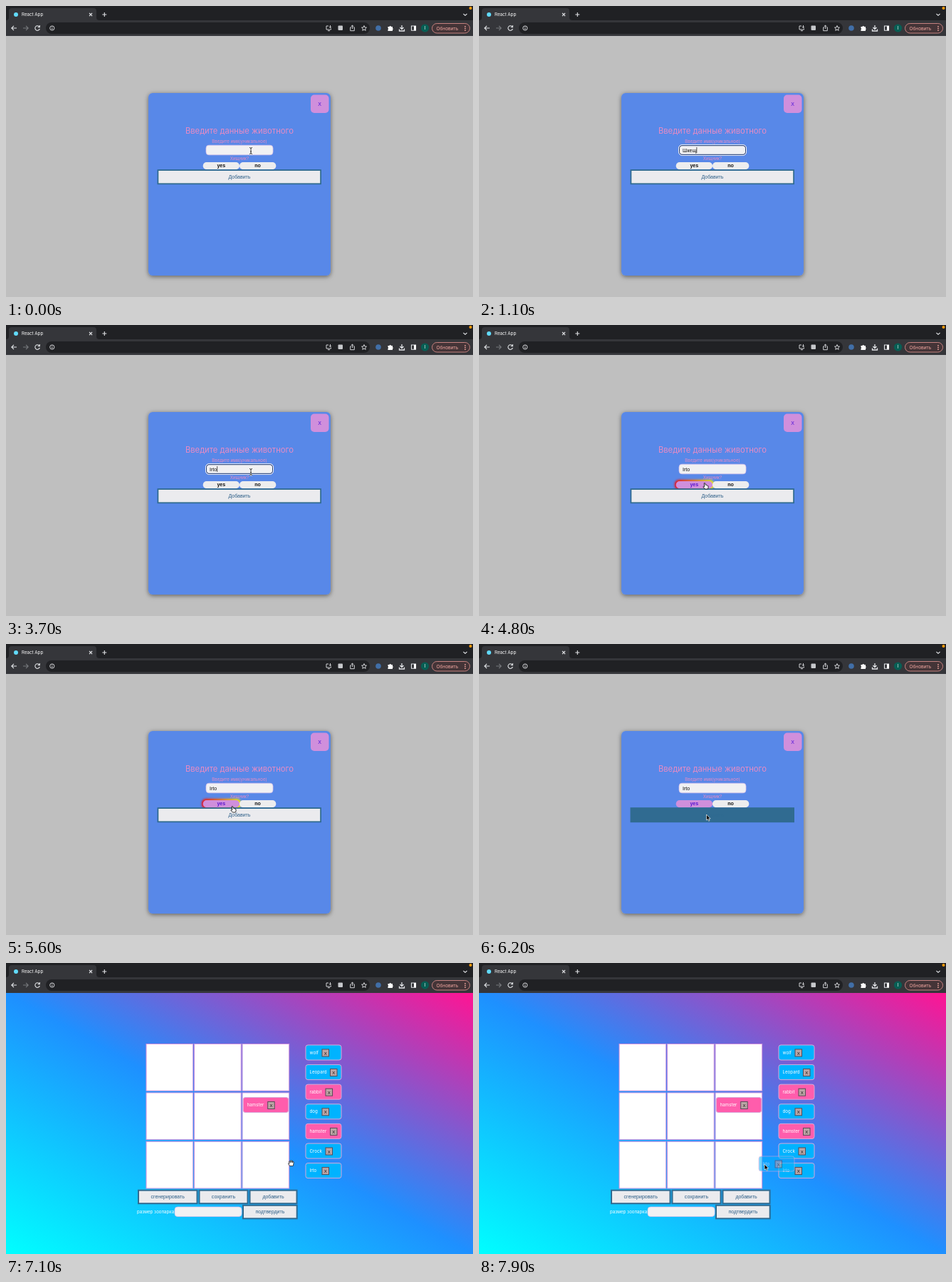
An HTML page for the animation above (8000 ms loop, 656 px wide and 408 px high).

```html
<!DOCTYPE html>
<html lang="ru">
<head>
<meta charset="utf-8">
<title>React App</title>
<style>
  html, body { margin: 0; width: 100%; height: 100%; overflow: hidden; background: #bfbfbf; }
  svg { display: block; }
  text { font-family: Inter, Roboto, sans-serif; font-size: 6.2px; fill: #fff; }
  .mid { text-anchor: middle; }
  .arial { font-family: "Liberation Sans", Arial, sans-serif; font-size: 7px; fill: #111; }
  .teal { fill: #2b5d86; }
  .bold { font-weight: bold; }
  .pink { fill: #e78bc4; }
  .icon { fill: none; stroke: #e2e4e7; stroke-width: 1.1; }
  .button { fill: #ebebee; stroke: #306b91; stroke-width: 2; }
  .field { fill: #f1f1f3; stroke: #d9bfe9; stroke-width: .7; }
  .cell { fill: #fff; stroke: #cc8edb; stroke-width: 1; }
  .card { stroke: #d9a7d9; stroke-width: 1; }
</style>
</head>
<body>
<svg id="stage" width="656" height="408" viewBox="0 0 656 408">
  <defs>
    <linearGradient id="sky" x1="0" y1="1" x2="1" y2="0">
      <stop stop-color="#0ff"/><stop offset=".5" stop-color="#1e90ff"/><stop offset="1" stop-color="#ff1493"/>
    </linearGradient>
    <linearGradient id="fire">
      <stop stop-color="#f00"/><stop offset=".5" stop-color="#ff7300"/><stop offset="1" stop-color="#fffb00"/>
    </linearGradient>
    <linearGradient id="glass" x2="0" y2="1">
      <stop stop-color="#223356"/><stop offset="1" stop-color="#28344f"/>
    </linearGradient>
    <filter id="blur" x="-20%" y="-60%" width="140%" height="220%"><feGaussianBlur stdDeviation="1.7"/></filter>
    <filter id="shadow"><feDropShadow dx="0" dy="1.5" stdDeviation="3" flood-opacity=".5"/></filter>
    <g id="ibeam" fill="none">
      <path id="beam" d="M-2 -4.5Q0 -4.5 0 -3Q0 -4.5 2 -4.5M0 -3V3M-2 4.5Q0 4.5 0 3Q0 4.5 2 4.5M-1 1H1" stroke="#fff" stroke-width="2"/>
      <path d="M-2 -4.5Q0 -4.5 0 -3Q0 -4.5 2 -4.5M0 -3V3M-2 4.5Q0 4.5 0 3Q0 4.5 2 4.5M-1 1H1" stroke="#222" stroke-width=".9"/>
    </g>
    <path id="arrow" d="M0 -3V5L1.8 3.4L3.1 6.2L4.5 5.6L3.2 2.9H5.6Z" fill="#000" stroke="#fff" stroke-width=".7"/>
    <path id="hand" d="M-1.8 -3.2Q-.8 -4.2 -.2 -3L.4 -.7Q1.4 -1.2 1.8 -.2Q2.8 -.5 3 .4Q4 .3 4 1.2Q4.4 3.4 3.2 5H-.6L-3.2 1.8Q-2.7 .8 -1.2 1.7Z" fill="#fff" stroke="#000" stroke-width=".8"/>
    <path id="grab" d="M-2 4.3L-4 1Q-3.6 0 -2.4 1.2L-3 -2Q-2.2 -3.2 -1.5 -2L-1.2 -.5L-1 -3Q0 -4.2 .5 -3V-.6L1.2 -2.9Q2.3 -3.5 2.3 -2L2 -.2L2.8 -1.7Q4 -1.7 3.7 -.4L2.8 4.3Z" fill="#fff" stroke="#222" stroke-width=".8"/>
  </defs>

  <!-- browser -->
  <rect width="656" height="42" fill="#202124"/>
  <path d="M0 42V20Q4 20 4 16V7Q4 3 8 3H123Q127 3 127 7V16Q127 20 131 20H656V42Z" fill="#35363a"/>
  <circle id="favicon" cx="14" cy="12" r="3" fill="#61dafb"/>
  <text x="22" y="14.2">React App</text>
  <path class="icon" d="M117 10L121 14M121 10L117 14M135.300 12H141.300M138.300 9V15M642.500 11L645 13.300L647.500 11"/>
  <circle cx="652.500" cy="3" r="2" fill="#ff9d0a"/>
  <path class="icon" d="M15 31H8M11 27.800L7.800 31L11 34.200"/>
  <path class="icon" d="M24 31H31M28 27.800L31.200 31L28 34.200" style="stroke:#77797d"/>
  <path class="icon" id="reload" d="M46.700 29A3.300 3.300 0 1 0 47.300 32M47.300 27V29.700H44.700"/>
  <path class="icon" id="stop" d="M41.300 28.300L46.700 33.700M46.700 28.300L41.300 33.700"/>
  <rect x="56" y="23" width="455" height="16" rx="8" fill="#202124"/>
  <g class="icon" style="stroke-width:.9">
    <circle cx="64.800" cy="31" r="3.100"/><path d="M64.800 30.500V33M64.800 28.800V29.700"/>
    <path d="M453 28H450V33H456.500V31.500M452 34.700H455M455.500 27V30.500M454 29.200L455.500 30.700L457 29.200"/>
    <path d="M485 30H483.700V34.700H489.300V30H488M486.500 32V27.200M484.700 28.800L486.500 27L488.300 28.800"/>
    <path d="M503 27.500L504 30L506.500 30.200L504.600 31.900L505.200 34.400L503 33L500.800 34.400L501.400 31.900L499.500 30.200L502 30Z"/>
  </g>
  <rect x="466.500" y="27.500" width="6.500" height="6.500" rx="1" fill="#c6c8cb"/>
  <circle cx="523" cy="31" r="3.800" fill="#416fa8"/>
  <path d="M536.500 29H538.500A1.300 1.300 0 0 1 541 29H543V31A1.300 1.300 0 0 1 543 33.300V35H536.500V33A1.200 1.200 0 0 0 536.500 31Z" fill="#fff"/>
  <path class="icon" d="M556 27V32M553.500 30L556 32.500L558.500 30M552.500 32.500V35H559.500V32.500" style="stroke-width:1.300"/>
  <path class="icon" d="M569.500 28H575.500V34.300H569.500Z"/><rect x="573" y="28" width="3" height="6.300" fill="#fff"/>
  <circle cx="588.500" cy="31" r="5.600" fill="#075e54"/><text class="mid" x="588.500" y="33">I</text>
  <rect x="598.500" y="24.500" width="53" height="13.500" rx="6.750" fill="#443437" stroke="#d58b87" stroke-width=".9"/>
  <text x="604.500" y="33.500" style="font-size:6.500px;fill:#f5a9a3">Обновить</text>
  <path d="M645 28V35" stroke="#f5a9a3" stroke-width="1.500" stroke-dasharray="1.500 1.250"/>

  <g id="dialog">
    <rect y="42" width="656" height="366" fill="#bfbfbf"/>
    <rect x="200" y="122" width="256" height="256" rx="6" fill="#5888e8" filter="url(#shadow)"/>
    <rect x="428" y="124.500" width="25.500" height="25.500" rx="5" fill="#d08fdc"/>
    <text class="mid arial" x="440.500" y="140" style="fill:#4b10d8">X</text>
    <text class="mid pink" x="328" y="179.300" style="font-size:11.250px">Введите данные животного</text>
    <text class="mid pink" x="328" y="192.300" style="font-size:6.100px">Введите имя(уникальное)</text>
    <rect class="field" x="281" y="195.200" width="94" height="13.600" rx="4"/>
    <g id="focus" fill="none">
      <rect x="280.500" y="194.700" width="95" height="14.600" rx="4.500" stroke="#fff"/>
      <rect x="281.500" y="195.700" width="93" height="12.600" rx="3.500" stroke="#17356f"/>
    </g>
    <text class="arial" id="typed" x="286" y="204.600"></text>
    <rect id="caret" y="198" width=".7" height="8" fill="#111"/>
    <text class="mid pink" x="328" y="216" style="font-size:6.100px">Хищник?</text>
    <rect id="glow" x="275" y="217" width="55" height="14" rx="6" fill="url(#fire)" filter="url(#blur)"/>
    <rect id="yes" x="276.700" y="219" width="51.300" height="10.300" rx="5"/>
    <text class="mid arial bold" id="yesText" x="302.300" y="226.300">yes</text>
    <rect x="328" y="219" width="51.300" height="10.300" rx="5" fill="#ededee"/>
    <text class="mid arial bold" x="353.500" y="226.300">no</text>
    <rect x="212.500" y="229.200" width="230.500" height="21" fill="#306b91"/>
    <rect id="inner" fill="#ebebee"/>
    <text class="mid arial teal" x="328" y="242.200">Добавить</text>
    <g id="popup">
      <rect x="264.500" y="147" width="126.500" height="81.500" rx="12" fill="url(#glass)"/>
      <rect x="275" y="188" width="106" height="30" rx="5" fill="#414d68"/>
      <text class="mid" x="327.700" y="175.300" style="font-size:8.800px;fill:#dce3f2">Русская</text>
      <text class="mid" x="327.700" y="206.200" style="font-size:8.800px">ABC</text>
    </g>
  </g>

  <g id="page">
    <rect y="42" width="656" height="366" fill="url(#sky)"/>
    <g id="board"></g>
    <text x="184" y="351" style="font-size:6.150px">размер зоопарка</text>
    <rect class="field" x="237" y="342" width="94" height="13.500" rx="4"/>
  </g>
  <use id="cursor"/>
</svg>
<script>
const PERIOD = 8000, STEP = 100;
const PET = "Irto", WRONG = "Шкещ";
const BLUE = "#00b3ff", PINK = "#ff5dac";
const $ = id => document.getElementById(id);
const clamp = v => Math.max(0, Math.min(1, v));
const show = (id, on) => { $(id).style.display = on ? "" : "none"; };

function add(parent, tag, attrs, text = "") {
  const el = document.createElementNS("http://www.w3.org/2000/svg", tag);
  for (const key in attrs) el.setAttribute(key, attrs[key]);
  el.textContent = text;
  return parent.appendChild(el);
}

function card(id, name, x, y, width, fill, closeX) {
  const g = add($("page"), "g", { id, transform: `translate(${x} ${y})` });
  add(g, "rect", { class: "card", x: .5, y: .5, width: width - 1, height: 21, rx: 3, fill });
  add(g, "text", { x: 6, y: 13.2 }, name);
  add(g, "rect", { x: closeX - 4.5, y: 6.5, width: 9.5, height: 10, fill: "#bba5a5", stroke: "#574b56" });
  add(g, "text", { class: "mid arial", x: closeX + .2, y: 14, style: "font-size:6px" }, "X");
}

function pageButton(label, x, y, width) {
  add($("page"), "rect", { class: "button", x: x + 1, y: y + 1, width: width - 2, height: 18.5 });
  add($("page"), "text", { class: "mid arial teal", x: x + width / 2, y: y + 12.3 }, label);
}

for (let i = 0; i < 9; i++)
  add($("board"), "rect", { class: "cell", x: 197 + i % 3 * 67.5, y: 113.5 + Math.floor(i / 3) * 68.4, width: 65.7, height: 65.7 });
pageButton("сгенерировать", 185, 317.7, 84.5);
pageButton("сохранить", 270.5, 317.7, 70);
pageButton("добавить", 341.5, 317.7, 68);
pageButton("подтвердить", 332, 338.8, 77.7);
card("placed", "hamster", 332.7, 188, 64.5, PINK, 39.5);
[["wolf", 28], ["Leopard", 39.5], ["rabbit", 33], ["dog", 28], ["hamster", 39.5], ["Crock", 33], [PET, 28]]
  .forEach(([name, closeX], i) =>
    card("pet" + i, name, 420.5, 114.5 + i * 27.6, 51, /rabbit|hamster/.test(name) ? PINK : BLUE, closeX));
card("ghost", PET, 0, 0, 51, BLUE, 28);
$("ghost").style.opacity = .55;

const path = [[0, 344, 203], [3600, 344, 203], [3700, 344, 206], [4500, 329, 229], [4700, 329, 229], [4800, 318, 225],
  [5600, 319, 231], [5700, 320, 236], [6200, 319.5, 242], [6300, 319, 238], [6500, 319, 238], [7400, 429, 295], [7900, 401, 285]];

function pointer(t) {
  const i = Math.max(1, path.findIndex(p => p[0] >= t));
  const [t0, x0, y0] = path[i - 1], [t1, x1, y1] = path[i];
  const u = (t - t0) / (t1 - t0), k = u * u * (3 - 2 * u);
  return [x0 + (x1 - x0) * k, y0 + (y1 - y0) * k];
}

function typedText(t) {
  if (t >= 3200) return PET.slice(0, (t - 3100) / 100);
  if (t >= 1300) return WRONG.slice(0, Math.max(0, (1600 - t) / 100));
  return WRONG.slice(0, [600, 700, 900, 1000].filter(at => t >= at).length);
}

function cursorKind(t) {
  if (t < 600) return "ibeam";
  if (t < 3700) return "";
  if (t < 4200) return "ibeam";
  if (t < 5700) return "hand";
  return t < 6300 || t >= 7500 ? "arrow" : "grab";
}

function render(t) {
  const inDialog = t < 6300, loading = t >= 6300 && t < 6500;
  const focused = t >= 200 && t < 4500, chosen = t >= 4800;
  show("dialog", inDialog);
  show("page", !inDialog);
  show("favicon", !loading);
  show("reload", !loading);
  show("stop", loading);
  show("popup", t >= 1900 && t < 2600);
  show("focus", focused);
  show("caret", focused);
  $("typed").textContent = typedText(t);
  if (focused) $("caret").setAttribute("x", 286.3 + $("typed").getComputedTextLength());

  $("yes").setAttribute("fill", chosen ? "#d08fdc" : "#ededee");
  $("yesText").style.fill = chosen ? "#5a16d0" : "#111";
  $("glow").style.opacity = chosen ? 1 - clamp((t - 5600) / 300) : 0;
  const inset = 1.8 + 8.7 * clamp((t - 5600) / 400);
  const box = { x: 212.5 + inset, y: 229.2 + inset, width: 230.5 - 2 * inset, height: 21 - 2 * inset };
  for (const key in box) $("inner").setAttribute(key, Math.max(0, box[key]));
  // the label shares the border colour, so it vanishes as the border grows
  $("inner").nextElementSibling.style.fill = inset > 9 ? "#306b91" : "";

  show("pet6", t >= 6500);
  show("ghost", t >= 7500);
  const [x, y] = pointer(t), kind = cursorKind(t);
  $("ghost").setAttribute("transform", `translate(${x - 8.5} ${y - 14.5})`);
  show("cursor", kind);
  $("cursor").setAttribute("href", "#" + kind);
  $("cursor").setAttribute("transform", `translate(${x} ${y})`);
}

function tick() {
  render(Math.floor(performance.now() % PERIOD / STEP) * STEP);
  requestAnimationFrame(tick);
}
tick();
</script>
</body>
</html>
```
